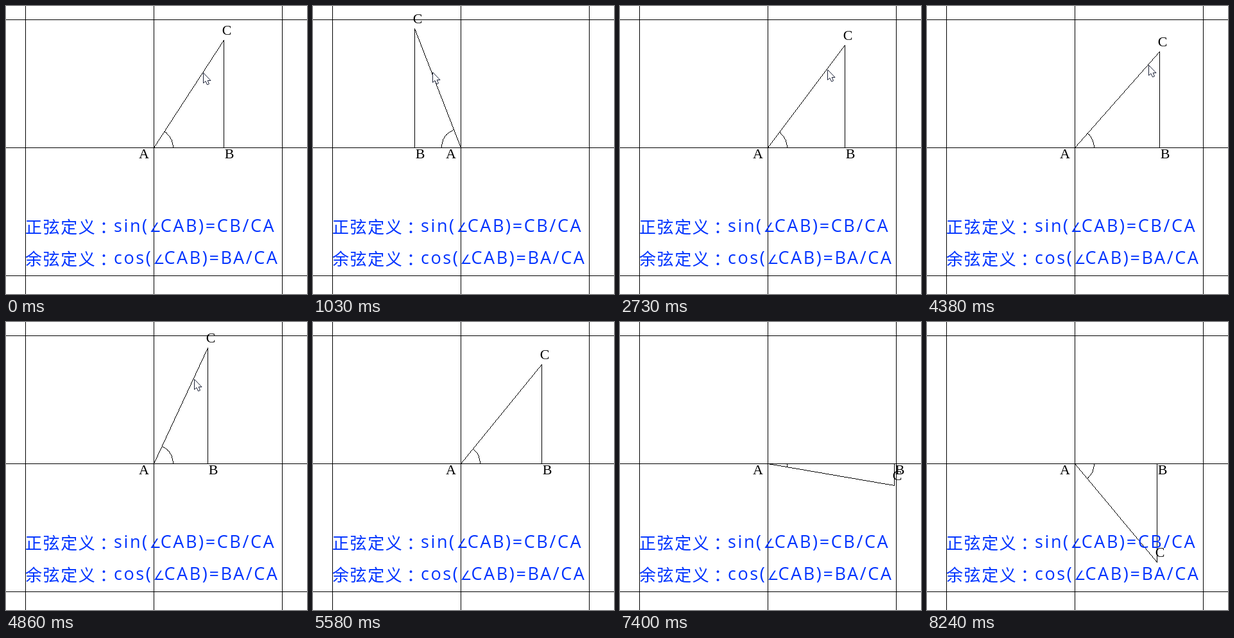
Write an HTML page with a canvas that moves like this. It is 469 px wide and 450 px high and loops after 8740 ms.

```html
<!DOCTYPE html>
<html lang="zh-CN">
<head>
<meta charset="utf-8">
<title>正弦与余弦</title>
<style>
html, body { margin: 0; width: 100%; height: 100%; overflow: hidden; background: #fff; }
canvas { display: block; }
</style>
</head>
<body>
<canvas id="stage" width="469" height="450"></canvas>
<script>
const W = 469, H = 450, LOOP = 8740;
const ctx = document.getElementById('stage').getContext('2d');
const AX = 230, AY = 221, R = 200, ARC = 30;
const CURSOR_END = 5580;
const rad = d => d * Math.PI / 180;

// Turns of the hypotenuse: start ms, end ms, angle reached
const FIRST = 57;
const TURNS = [
  [430, 1390, 136.2],
  [2070, 2820, 48.65],
  [4440, 4680, 30],
  [4680, 4980, 84],
  [4980, 5160, 53.6],
  [5280, 5400, 52.6],
  [5460, 6000, 44.8],
  [6680, 7580, -23.4],
  [7580, 8240, -50.3]
];

function ease(u, p) {
  return u < 0.5 ? 0.5 * (2 * u) ** p : 1 - 0.5 * (2 - 2 * u) ** p;
}

// Dragging is eased and quick; later turns are steady with a coarser step.
function angleAt(t) {
  let angle = FIRST;
  for (const [from, to, goal] of TURNS) {
    if (t < from) break;
    const steady = to > CURSOR_END;
    const step = steady ? 120 : 60;
    const held = t >= to ? to - from : Math.floor((t - from) / step) * step;
    angle += (goal - angle) * ease(held / (to - from), steady ? 1 : 1.6);
  }
  return angle;
}

// Crisp one-pixel line; halves round down
function line(x0, y0, x1, y1) {
  const n = Math.max(Math.abs(x1 - x0), Math.abs(y1 - y0)) || 1;
  const at = (a, b, i) => Math.ceil(a + (b - a) * i / n - 0.5);
  for (let i = 0; i <= n; i++) ctx.fillRect(at(x0, x1, i), at(y0, y1, i), 1, 1);
}

function angleArc(angle) {
  const base = angle > 90 ? 180 : 0;
  const n = Math.ceil(Math.abs(angle - base) / 4);
  const point = i => {
    const a = rad(base + (angle - base) * i / n);
    return [Math.round(AX + ARC * Math.cos(a)), Math.round(AY - ARC * Math.sin(a))];
  };
  for (let i = 0; i < n; i++) line(...point(i), ...point(i + 1));
}

function text(s, x, y, font, spacing = 0, align = 'left') {
  ctx.font = font;
  ctx.letterSpacing = spacing + 'px';
  ctx.textAlign = align;
  ctx.fillText(s, x, y);
  return x + ctx.measureText(s).width;
}

function label(s, x, y) {
  text(s, x, y, '22px "Liberation Serif", serif', 0, 'center');
}

function formula(title, fn, ratio, y) {
  const han = '26px "Noto Sans CJK SC", "Noto Sans CJK", sans-serif';
  const latin = '500 27px "Open Sans", "Noto Sans", sans-serif';
  text(title, 30, y + 2, han, 1.6);
  text('：', 146, y + 2, han);
  const x = text(fn, 168, y, latin, 2.6);
  text('∠', x + 1, y, '20px "DejaVu Sans", sans-serif');
  text('CAB)=' + ratio, x + 18, y, latin, 2.6);
}

function cursor(angle, t) {
  const a = rad(angle - 0.5);
  const height = 117 + 12 * (t / 4380) ** 2;
  const dist = Math.min(173, height / Math.sin(a));
  ctx.save();
  ctx.translate(Math.round(AX + dist * Math.cos(a)) + 0.5, Math.round(AY - dist * Math.sin(a)) + 0.5);
  const arrow = new Path2D('M0 0V16L3.5 13L6 18.5L9 17.3L6.7 12H11.5Z');
  ctx.fillStyle = '#fff';
  ctx.fill(arrow);
  ctx.strokeStyle = '#1c2238';
  ctx.stroke(arrow);
  ctx.restore();
}

function draw(t) {
  const angle = angleAt(t);
  const cx = Math.round(AX + R * Math.cos(rad(angle)));
  const cy = Math.round(AY - R * Math.sin(rad(angle)));

  ctx.fillStyle = '#fff';
  ctx.fillRect(0, 0, W, H);

  ctx.fillStyle = '#000';
  for (const k of [-R, 0, R]) {
    ctx.fillRect(AX + k, 0, 1, H);
    ctx.fillRect(0, AY + k, W, 1);
  }
  line(AX, AY, cx, cy);
  line(cx, AY, cx, cy);
  angleArc(angle);
  label('A', 215, 238);
  label('B', cx + 9, 238);
  label('C', cx + 5, cy - 8);

  ctx.fillStyle = '#0033ff';
  formula('正弦定义', 'sin(', 'CB/CA', 353);
  formula('余弦定义', 'cos(', 'BA/CA', 403);

  if (t < CURSOR_END) cursor(angle, t);
}

const began = performance.now();
function tick() {
  draw((performance.now() - began) % LOOP);
  requestAnimationFrame(tick);
}
tick();
</script>
</body>
</html>
```
